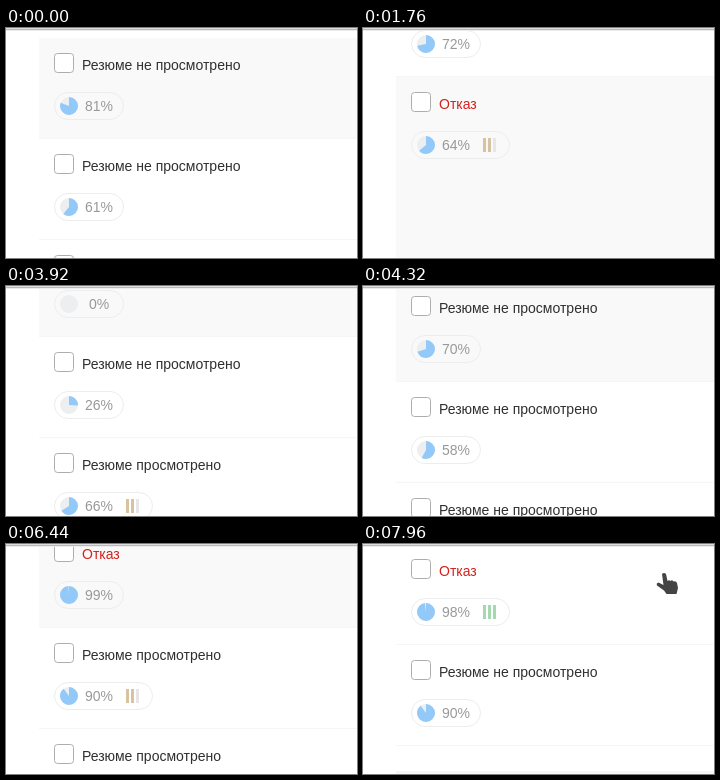
These frames come from a looping animation (351 px wide and 230 px high, 8000 ms). An HTML page with a canvas:

```html
<!DOCTYPE html>
<html lang="ru">
<head>
<meta charset="utf-8">
<style>
  html, body { margin: 0; width: 100%; height: 100%; overflow: hidden; background: #fff; }
  canvas { display: block; }
</style>
</head>
<body>
<canvas id="stage" width="351" height="230"></canvas>
<script>
const ctx = document.getElementById('stage').getContext('2d');
const LOOP = 8000, STEP = 40, LEFT = 33, WIDTH = 351, HEIGHT = 230;
const ROW = 101, TALL_ROW = 214, MOUSE_Y = 50, MOUSE_ENTERS = 7920;

const UNREAD = 'Резюме не просмотрено', READ = 'Резюме просмотрено', REFUSED = 'Отказ';
const TAN = ['#d8c3a0', '#d8c3a0', '#e6e6e6'];
const GREEN = ['#a3d9ae', '#a3d9ae', '#a3d9ae'];

// status, match percent, rating bars, height
const rows = [
  [UNREAD, 81], [UNREAD, 61], [UNREAD, 72], [REFUSED, 64, TAN, TALL_ROW],
  [UNREAD, 66, TAN], [UNREAD, 0], [UNREAD, 26], [READ, 66, TAN],
  [UNREAD, 70], [UNREAD, 58], [UNREAD, 73, GREEN], [REFUSED, 83],
  [UNREAD, 77], [REFUSED, 99], [READ, 90, TAN], [READ, 85],
  [UNREAD, 79], [REFUSED, 98, GREEN], [UNREAD, 90]
].map(([status, percent, bars, height = ROW]) => ({ status, percent, bars, height }));

let listEnd = 10;
for (const row of rows) {
  row.top = listEnd;
  listEnd += row.height;
}

// start, end, scroll position reached
const bursts = [
  [520, 840, 132], [1480, 1760, 264], [2120, 2360, 396],
  [2840, 3200, 672], [3880, 4320, 936], [4680, 5160, 1226],
  [5560, 6000, 1446], [6400, 6800, 1708], [7360, 7680, 1840]
];

// The hovered row only updates once scrolling has settled.
function scrollAt(t) {
  let settled = 0;
  for (const [start, end, target] of bursts) {
    if (t <= start) break;
    if (t < end) {
      const u = (t - start) / (end - start);
      return { y: Math.round(settled + (target - settled) * u * u * (3 - 2 * u)), settled };
    }
    settled = target;
  }
  return { y: settled, settled };
}

function rect(x, y, w, h, color) {
  ctx.fillStyle = color;
  ctx.fillRect(x, y, w, h);
}

function roundBox(x, y, w, h, r, stroke, fill) {
  ctx.beginPath();
  ctx.roundRect(x + 0.5, y + 0.5, w - 1, h - 1, r);
  if (fill) {
    ctx.fillStyle = fill;
    ctx.fill();
  }
  ctx.strokeStyle = stroke;
  ctx.lineWidth = 1;
  ctx.stroke();
}

function text(str, x, y, color, align = 'left') {
  ctx.font = '14px "Liberation Sans", Arial, sans-serif';
  ctx.textAlign = align;
  ctx.fillStyle = color;
  ctx.fillText(str, x, y);
}

function pie(x, y, share, color) {
  ctx.beginPath();
  ctx.moveTo(x, y);
  ctx.arc(x, y, 9, -Math.PI / 2, (share * 2 - 0.5) * Math.PI);
  ctx.fillStyle = color;
  ctx.fill();
}

function drawRow({ status, percent, bars, height }, y, hovered) {
  if (hovered) rect(LEFT, y, WIDTH - LEFT, height, '#f9f9f9');
  rect(LEFT, y + height - 1, WIDTH - LEFT, 1, '#f6f6f6');
  roundBox(48, y + 15, 20, 20, 3, '#adadad', '#fff');
  text(status, 76, y + 32, status === REFUSED ? '#d3211c' : '#303030');
  roundBox(48, y + 54, bars ? 99 : 70, 28, 13.5, '#ebedef');
  pie(63, y + 68, 1, '#eceeef');
  if (percent) pie(63, y + 68, percent / 100, '#93c9f8');
  text(percent + '%', 93, y + 73, '#999', 'center');
  if (bars) bars.forEach((color, i) => rect(120 + i * 5, y + 61, 3, 14, color));
}

const hand = new Path2D(
  'M6 2Q8 0 10 2L11.5 9Q13 7.5 14.5 9Q16 7.5 17.5 9.5Q20 8.5 21 11L22 16L20.5 22' +
  'L10.5 22L8 18.5L1 13.5Q0 11 2.5 10.5L7.5 13Z');

function drawHand(x, y) {
  ctx.save();
  ctx.translate(x, y);
  ctx.strokeStyle = '#fff';
  ctx.lineWidth = 2;
  ctx.stroke(hand);
  ctx.fillStyle = '#444';
  ctx.fill(hand);
  ctx.restore();
}

function draw(now) {
  const t = Math.floor(now % LOOP / STEP) * STEP;
  const { y: scroll, settled } = scrollAt(t);
  const mouse = settled + MOUSE_Y;
  rect(0, 0, WIDTH, HEIGHT, '#fff');
  for (const row of rows) {
    const y = row.top - scroll;
    if (y > HEIGHT || y + row.height < 0) continue;
    const hovered = t < MOUSE_ENTERS && mouse >= row.top && mouse < row.top + row.height;
    drawRow(row, y, hovered);
  }
  rect(LEFT, listEnd + 25 - scroll, WIDTH - LEFT, 3, '#f5f5f5');

  rect(0, 0, WIDTH, 1, '#dedede');
  rect(0, 1, WIDTH, 1, '#b9b9b9');
  rect(0, 2, WIDTH, 1, '#ececec');

  if (t >= MOUSE_ENTERS) {
    const u = (t - MOUSE_ENTERS) / STEP;
    drawHand(331 - 38 * u, 49 - 21 * u);
  }
}

const began = performance.now();
function tick() {
  draw(performance.now() - began);
  requestAnimationFrame(tick);
}
tick();
</script>
</body>
</html>
```
